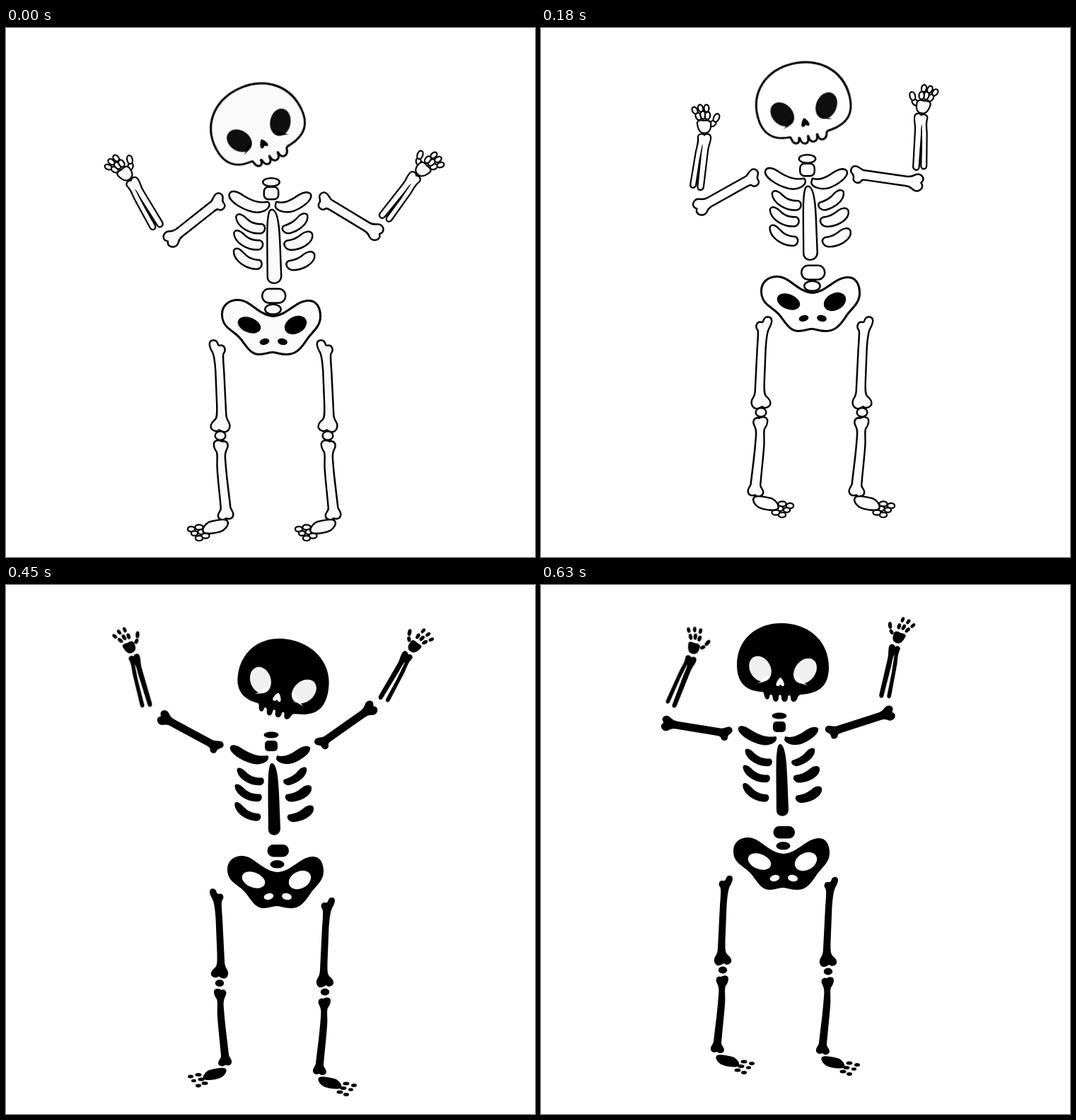
Recreate the animation shown at these times as an HTML page. Size 748 by 748 pixels, loop 720 ms.

```html
<!DOCTYPE html>
<html lang="en">
<head>
<meta charset="utf-8">
<title>Dancing skeleton</title>
<style>
html, body { margin: 0; width: 100%; height: 100%; overflow: hidden; background: #fff; }
svg { display: block; width: 100vw; height: 100vh; }
#dance {
  stroke: #000; stroke-linejoin: round; paint-order: stroke;
  animation: ink 720ms step-end infinite;
}
.pose { stroke-width: var(--line); animation: show 720ms step-end infinite; }
.bold { stroke-width: calc(var(--line) * 1.25); }
.fine { stroke-width: calc(var(--line) * .9); }
.hole { fill: currentColor; stroke: none; }
.eye { fill-opacity: .94; }
/* each pose appears first as an outline, then as a solid shape */
@keyframes ink {
  0% { fill: #fafafa; color: #000; --line: 4.9px; }
  12.5%, 37.5%, 62.5%, 87.5% { fill: #000; color: #fff; --line: 0px; }
  25%, 50%, 75% { fill: #fff; color: #000; --line: 4.9px; }
  100% { fill: #fafafa; color: #000; --line: 4.9px; }
}
@keyframes show {
  0% { opacity: 1; }
  25%, 100% { opacity: 0; }
}
</style>
</head>
<body>
<svg viewBox="0 0 748 748">
  <defs>
    <g id="head"><g transform="translate(-341.5 -119.5)">
      <path class="bold" d="M340 54C303 54 277 78 277 113C277 138 290 150 312 151C315 151 315 153 316 157C317 163 323 163 323 158C323 154 327 154 327.5 158C328 167 336 167 336 159C336 154 340 154 340 159C340 167 349 167 349 159C349 155 353 155 353 159C353 167 361 167 363 159C364 155 367 155 372 154.5C394 152 407 142 407 116C407 79 378 54 340 54Z"/>
      <g class="hole eye">
        <ellipse rx="19" ry="14.5" transform="translate(310 118.5) rotate(60)"/>
        <ellipse rx="19.5" ry="14.5" transform="translate(373.5 121.5) rotate(-53)"/>
        <path d="M325 126Q322 137 306 139Q313 136 315 131Z"/>
        <path d="M358 126Q361 139 377 142Q370 138 368 134Z"/>
      </g>
      <path class="hole" d="M338.5 131C341 132 344 138 344 141C343.5 144 340 143.5 338.5 140.5C337 143.5 333 144 332.5 141C332.5 138 336 132 338.5 131Z"/>
    </g></g>

    <g id="torso">
      <ellipse cx="375" cy="218" rx="10.5" ry="4.5"/>
      <rect x="366" y="226" width="18" height="15" rx="5"/>
      <path d="M317 235C319 230 327 232 335 238C348 246 358 249 370 247C374 251 368 259 355 259.5C340 259 314 244 317 235Z"/>
      <path d="M383 247C392 250 401 246 410 240C420 233 427 232 430 236C432 243 418 253 408 257C396 262 383 257 382 252Z"/>
      <path id="ribL" d="M326.5 267C328 262 334 265 339 270C346 277 354 279 362 278.5C366 280 366 287 361 289C346 291 327 280 326.5 267Z"/>
      <use href="#ribL" x="-3" y="23"/>
      <use href="#ribL" transform="translate(-4 49.5) rotate(4 345 277)"/>
      <path d="M425 265C421 261 415 266 411 271C405 277 399 279 393 281C390 285 395 290 401 289C413 286 427 276 425 265Z"/>
      <path id="ribR" d="M432 292C430 287 423 289 418 293C411 299 404 301 397 302C392 305 396 312 402 312.5C416 313 434 303 432 292Z"/>
      <use href="#ribR" x="3" y="28.5"/>
      <path d="M376 258C382 258 385 275 386 300L388 350C388 363 371 362 371 352C371 330 370 290 371 275C372 264 373 258 376 258Z"/>
    </g>

    <g id="pelvis">
      <path class="bold" d="M307 405C307 393 316 386 328 386C345 386 355 407 378 409C398 408 410 387 428 387C438 387 443 396 443 408C443 422 432 428 424 440C414 455 408 460 396 460C388 460 382 457 377 457C371 457 366 460 358 460C350 460 345 455 337 444C330 433 322 429 316 424C309 418 307 412 307 405Z"/>
      <g class="hole">
        <ellipse rx="17" ry="10.5" transform="translate(344 420) rotate(22)"/>
        <ellipse rx="16.5" ry="12" transform="translate(409.5 420) rotate(-28)"/>
        <ellipse rx="7" ry="4.5" transform="translate(365.5 443.5) rotate(-15)"/>
        <ellipse rx="7" ry="4.7" transform="translate(391 443.5) rotate(12)"/>
      </g>
      <rect x="363.5" y="370" width="30.5" height="17.5" rx="8.5"/>
      <ellipse cx="377.5" cy="397.8" rx="10" ry="5.8"/>
    </g>

    <path id="upper" d="M8-5C4-6 2-8-2-9C-8-10-10-3-6 0C-4 2-3 3-3 6C-4 12 4 13 6 9C7 6 10 6 14 6L71 6C77 6 79 8 82 10C87 13 93 9 92.500 4C92 2 90 1 90 0C90-1 92-2 92.500-5C92-10 86-12 82-9C79-7 76-5 71-5Z"/>

    <g id="lower" class="fine">
      <path d="M-8 15C-7 11-2 11 0 14C2 11 8 11 8 16C8 22 5 26 4 34L-2 84C-2 90-9 91-8.5 85L-4 40C-3 33-2 28-3 25C-4 30-6 40-8 50L-13 83C-14 87-19.5 87-18.5 81L-11 36C-9 28-7 22-8 15Z"/>
      <ellipse rx="2.6" ry="4.3" transform="translate(-8.5 -14) rotate(-25)"/>
      <ellipse rx="2.6" ry="4.5" transform="translate(-2 -16) rotate(-8)"/>
      <ellipse rx="2.6" ry="4.3" transform="translate(4.5 -15) rotate(6)"/>
      <ellipse rx="2.4" ry="4" transform="translate(-13.5 -22.5) rotate(-28)"/>
      <ellipse rx="2.4" ry="4" transform="translate(-5.5 -25.5) rotate(-15)"/>
      <ellipse rx="2.4" ry="4" transform="translate(3 -25.5) rotate(-3)"/>
      <ellipse rx="2.5" ry="4" transform="translate(12 -4) rotate(50)"/>
      <ellipse rx="2.7" ry="5" transform="translate(17 -12) rotate(25)"/>
      <path d="M-9-4C-9-9-4-7 0-7C5-8 9-7 8-1C8 5 5 9 0 8.5C-6 9-8 3-9-4Z"/>
    </g>

    <g id="leg">
      <path d="M289 447C289 442 296 441 298 446C299 449 300 451 303 450C308 449 310 455 307 459C305 461 306 470 307 485L310 545C310 551 312 555 314 558C317 563 314 570 309 570C305 570 303 567 301 567C299 570 293 569 291 565C290 560 294 557 297 554C300 550 299.5 545 299.5 535L297.5 485C296.5 470 295 462 293 458C291 454 289 451 289 447Z"/>
      <ellipse cx="303" cy="576.5" rx="6.2" ry="5"/>
      <path d="M295 588C296 583 303 584 305 586C309 584 314 587 312 593C309 599 308 603 309 612C311 640 315 665 316 677C316 681 321 684 320 689C319 694 313 693 311 692C309 695 302 695 301 690C301 685 305 684 305 679C304 665 301 640 300 625C299 612 301 605 299 599C296 595 295 592 295 588Z"/>
      <g class="fine">
        <ellipse cx="273" cy="706" rx="4.5" ry="2.5"/>
        <ellipse cx="262" cy="708.5" rx="4" ry="2.5"/>
        <ellipse cx="277" cy="712.5" rx="4.5" ry="2.5"/>
        <ellipse cx="266.5" cy="714.5" rx="3.5" ry="2.2"/>
        <ellipse cx="282" cy="718" rx="4.5" ry="2.5"/>
        <ellipse cx="273" cy="721.5" rx="4" ry="2.4"/>
      </g>
      <path d="M280 712C278 708 283 702 288 699.5C296 697.5 307 695 311 697C315 700 311 706 306 709.5C298 713.5 284 715 280 712Z"/>
    </g>
  </defs>
</svg>
<script>
// head, upper and lower: x, y, angle; torso and pelvis: x, y; legs: x, y, flip
// pairs list the left side first, angles are seen from the bone's own side
const poses = [
  { head: [358.5, 146, -27], torso: [0, 0], pelvis: [0, 0],
    upper: [[300.5, 245, 38.3], [450, 244, 31.1]],
    lower: [[169, 206, -38], [589, 200, -45]],
    legs: [[0, 0, 1], [152, 0, 1]] },
  { head: [372, 115.5, -14], torso: [1.5, -33], pelvis: [6, -33],
    upper: [[300, 211, 29.2], [447, 206, 8.2]],
    lower: [[231, 139, 0], [540, 111, -10]],
    legs: [[614, -33, -1], [757, -33, -1]] },
  { head: [390.5, 142, 12], torso: [0, -6], pelvis: [6, -3],
    upper: [[298, 228, -28.3], [446, 223, -35.2]],
    lower: [[175, 88, -23], [577, 87, -37]],
    legs: [[-1, -13.5, 1], [754, -1, -1]] },
  { head: [341.5, 119.5, 0], torso: [-38, -33], pelvis: [-35, -29],
    upper: [[262, 209, -9.2], [411, 207, -17.8]],
    lower: [[216, 89, 15], [505.5, 74, -20]],
    legs: [[560, -32, -1], [709, -30, -1]] }
];

const part = (id, [x, y, turn = 0], flip = 1) =>
  `<use href="#${id}" transform="translate(${x} ${y}) scale(${flip} 1) rotate(${turn})"/>`;

const figure = (p, i) => `<g class="pose" style="animation-delay:${i * 180 - 720}ms">` +
  p.legs.map(([x, y, flip]) => part('leg', [x, y], flip)).join('') +
  part('pelvis', p.pelvis) + part('torso', p.torso) +
  p.upper.map((a, side) => part('upper', a, side ? 1 : -1)).join('') +
  p.lower.map((a, side) => part('lower', a, side ? -1 : 1)).join('') +
  part('head', p.head) + '</g>';

document.querySelector('svg').insertAdjacentHTML('beforeend',
  `<g id="dance">${poses.map(figure).join('')}</g>`);
</script>
</body>
</html>
```
